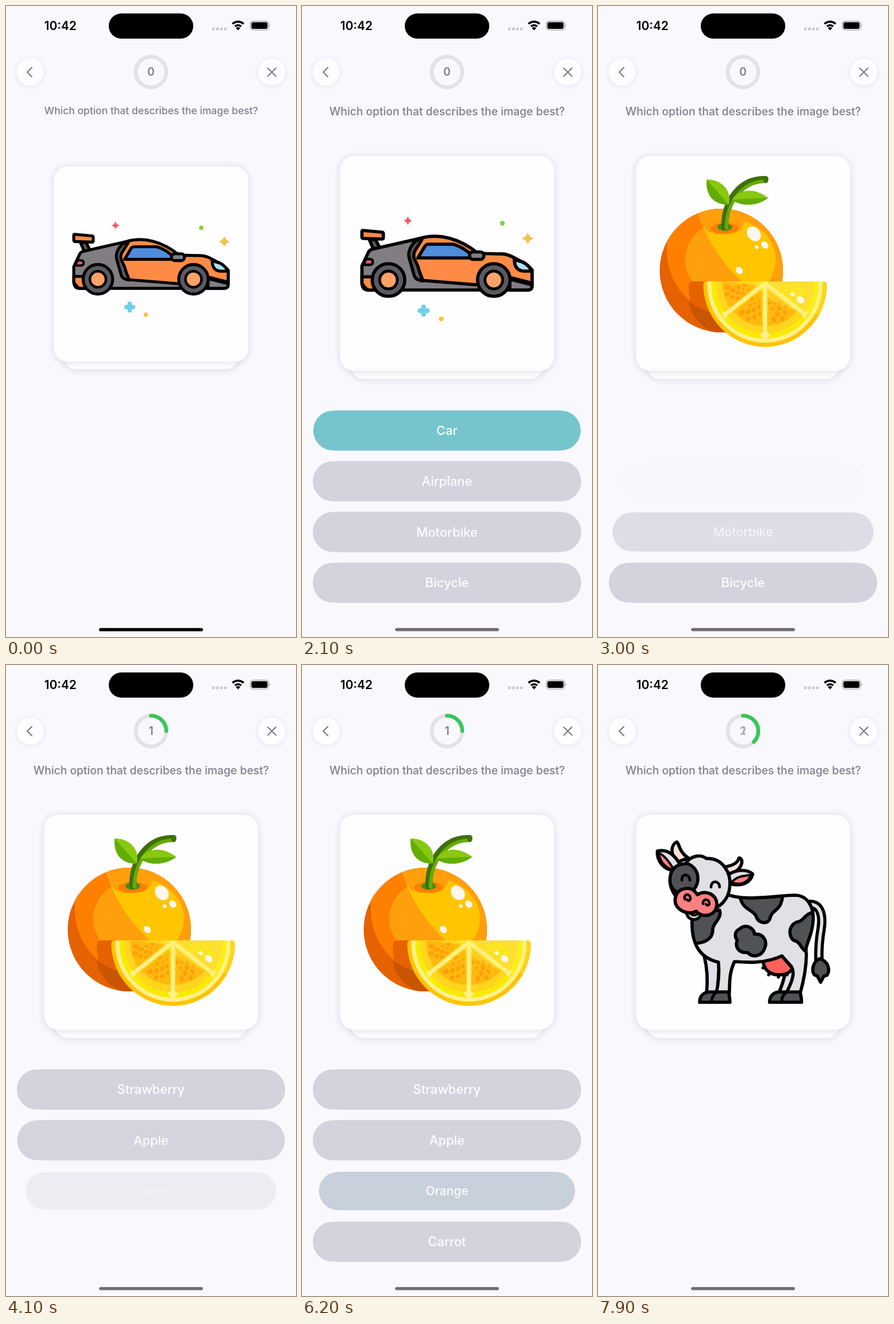
Animation of 508 by 1102 pixels, one loop 8 s. Source, as an HTML page with a canvas:

```html
<!DOCTYPE html>
<html lang="en">
<head>
<meta charset="utf-8">
<title>Picture quiz</title>
<style>
html, body { margin: 0; width: 100%; height: 100%; overflow: hidden; background: #f9f8fd; }
canvas { display: block; width: 508px; height: 1102px; }
</style>
</head>
<body>
<canvas id="stage"></canvas>
<script>
const W = 508, H = 1102, LOOP = 8000;
const BG = '#f9f8fd', WHITE = '#fefdff', INK = '#000', MUTED = '#807e8a';
const IDLE = [212, 210, 221], TEAL = [103, 195, 201];
const FONT = 'Inter, "Noto Sans", sans-serif';

const canvas = document.getElementById('stage');
const dpr = window.devicePixelRatio || 1;
canvas.width = W * dpr;
canvas.height = H * dpr;
const c = canvas.getContext('2d');

const clamp = v => Math.min(1, Math.max(0, v));
const ease = (t, start, dur) => {
  const p = clamp((t - start) / dur);
  return p * p * (3 - 2 * p);
};
const mix = (a, b, p) => `rgb(${a.map((v, i) => Math.round(v + (b[i] - v) * p))})`;

function paint(path, fill, stroke, width = 5.7) {
  const p = typeof path === 'string' ? new Path2D(path) : path;
  if (fill) { c.fillStyle = fill; c.fill(p); }
  if (stroke) { c.strokeStyle = stroke; c.lineWidth = width; c.stroke(p); }
}
function oval(x, y, rx, ry = rx, turn = 0) {
  const p = new Path2D();
  p.ellipse(x, y, rx, ry, turn, 0, Math.PI * 2);
  return p;
}
function box(x, y, w, h, r) {
  const p = new Path2D();
  p.roundRect(x, y, w, h, r);
  return p;
}
function text(str, x, y, size, weight, color) {
  c.font = `${weight} ${size}px ${FONT}`;
  c.textAlign = 'center';
  c.textBaseline = 'alphabetic';
  c.fillStyle = color;
  c.fillText(str, x, y);
}
function group(draw) { c.save(); draw(); c.restore(); }
function scaleAt(x, y, s) { c.translate(x, y); c.scale(s, s); c.translate(-x, -y); }
function shadow(blur, alpha, y = 0) {
  c.shadowColor = `rgba(40,36,60,${alpha})`;
  c.shadowBlur = blur * dpr;
  c.shadowOffsetY = y * dpr;
}
function star(x, y, r, color) {
  const k = r * 0.2;
  const arm = (px, py, qx, qy) => `Q${x + px} ${y + py} ${x + qx} ${y + qy}`;
  paint(`M${x} ${y - r}` + arm(k, -k, r, 0) + arm(k, k, 0, r) + arm(-k, k, -r, 0) + arm(-k, -k, 0, -r), color);
}

function drawCar() {
  const grey = '#807e82', dark = '#5b5a60', orange = '#fd8b45';
  paint('M118 408L126 427L137 424L129 408Z', dark, INK);
  paint('M107 392L140 395Q142.5 395.3 142.5 398V404Q142.5 407 139.5 407L108 406Q105 406 105 403V394Q105 392 107 392Z', orange, INK);
  paint('M206 406L122 425Q117 427 115 433L105 454V484Q106 496 116 496H394Q403 496 403 488V463L300 432Z', grey, INK);
  paint('M105 473H132V496H116Q109 492 105 484Z', orange, INK);
  paint('M108 452H118Q124 452 124 447Q124 442 118 442H112Z', '#ee5a6c', INK, 4.5);
  paint('M206 406C240 396 277 406 308 432L345 433C364 432 372 441 386 447Q396 453 403 461V484L364 474L330 487H307L208 479C200 462 198 450 192 440Q190 434 194 425Z', orange, INK);
  paint('M206 406Q189 416 187 433Q187 438 189 444L197 472Q200 479 212 480L205 462Q204 455 197 442Q194 435 198 427L210 408Z', dark, INK);
  paint('M203 440L215 420Q217 416 222 416H265Q283 421 298 436L301 440Z', '#4f8dda', INK);
  paint('M364 477L403 487V489Q403 496 395 496H364Z', grey, INK);
  paint('M372 443C372 457 379 463 390 463H403Q396 451 386 447Z', '#aee0f2', INK);
  paint(box(293.5, 429.5, 25, 13, 6), grey, INK);
  for (const x of [151.5, 336]) {
    paint(oval(x, 478.5, 28.5), dark, INK);
    paint(oval(x, 478.5, 15.5), '#fda267', INK, 5);
  }
  star(185.5, 375, 8, '#f05c6d');
  star(395.5, 406, 11, '#f1c24b');
  paint(oval(351, 379.5, 4.2), '#83d046');
  paint(oval(244, 546.5, 4.2), '#f8c636');
  paint('M213 525.5V538.5M206.5 532H219.5', null, '#70d0ea', 8.5);
}

function drawSlice() {
  const cx = 292.5, cy = 487, pith = '#fff08a';
  const half = r => `M${cx - r} ${cy}A${r} ${r} 0 0 0 ${cx + r} ${cy}V481H${cx - r}Z`;
  const ray = (a, r) => [cx + Math.cos(a) * r, cy - 3 + Math.sin(a) * r];
  const wedge = (a, b, r, inset) => {
    const p = new Path2D();
    p.moveTo(...ray((a + b) / 2, inset));
    p.lineTo(...ray(a + 0.06, r));
    p.arc(cx, cy - 3, r, a + 0.06, b - 0.06);
    p.closePath();
    return p;
  };
  group(() => {
    c.clip(new Path2D('M190 481H395Q401 481 401 487A108 108 0 0 1 184.5 487Q184.5 481 190 481Z'));
    paint(half(110), '#ffc400');
    paint(half(101), pith);
    paint(half(94), '#f8ea00');
    paint(half(85), '#ffd51f');
    const cuts = [-0.1, 0.67, Math.PI / 2, Math.PI - 0.67, Math.PI + 0.1];
    for (let i = 0; i < 4; i++) {
      const a = cuts[i], b = cuts[i + 1];
      paint(wedge(a, b, 75, 14), i ? '#ffba0d' : '#fdd516');
      for (let k = 0; k < 11; k++) {
        const f = (k * 0.618 + 0.31) % 1;
        const [x, y] = ray(a + 0.16 + (b - a - 0.32) * f, 32 + k * 3.7);
        const r = 2 + k * 0.28 + k % 2;
        paint(oval(x, y, r, r * 0.75, a + f), i ? '#ff9e0b' : '#f8e800');
      }
    }
    paint(`M${cx} 484L225 537M${cx} 484L361 537M${cx} 484V574`, null, pith, 6.5);
    paint(`M283 573Q291 570 ${cx} 562Q294 570 302 573L${cx} 584Z`, pith);
    paint('M217 534L231 534L222 547ZM368 534L354 534L363 547Z', pith);
    c.globalAlpha = 0.3;
    paint('M270 481C300 520 350 540 401 538V481Z', '#fff45c');
  });
  paint(oval(355, 513, 5.5, 7, -0.8), '#fff8ee');
  paint(oval(341, 503.5, 3, 3.5, -0.8), '#fff8ee');
}

function drawOrange() {
  const mid = '#ff8000', light = '#ff9f0c', deep = '#e66200', shine = '#fff6ee';
  const lit = new Path2D('M175 340V362C189 407 225 466 276 500L340 540V340Z');
  const glow = oval(232, 443, 79.5, 70);
  group(() => {
    c.clip(oval(216, 462, 108));
    paint('M100 340H340V590H100Z', deep);
    paint('M122 400C115 455 132 505 190 533L340 590V340H122Z', mid);
    paint(lit, light);
    paint(glow, light);
    group(() => { c.clip(lit); paint(glow, '#ffc500'); });
    paint('M187 386C189 403 253 405 256 377L222 366Z', light);
    paint('M159 489Q159 481 167 481H250V575H214C180 565 159 532 159 489Z', deep);
    paint('M159 516Q174 527 197 535L230 575H214C184 564 163 545 159 516Z', '#c95500');
  });
  paint(oval(222, 388.5, 25.5, 9.5), mid);
  paint(oval(222, 386, 13, 6.5), '#4c8d16');
  paint('M222 386C222 341 248 303 292 303', null, '#3f7008', 12.5);
  paint('M225 388C225 345 252 307 292 306', null, '#66aa08', 6);
  paint(oval(294, 303, 4.5, 6.3), '#3f7008');
  paint('M190.5 303C210 302 236 317 229 347C201 347 188 329 190.5 303Z', '#88c80f');
  paint('M190.5 303L229 347C201 347 188 329 190.5 303Z', '#62ad00');
  paint('M235 338C251 317 276 319 298 335C280 350 250 351 235 338Z', '#88c80f');
  paint('M235 338L298 335C280 350 250 351 235 338Z', '#62ad00');
  paint(oval(273, 398, 11, 14, -0.7), shine);
  paint(oval(292, 417.5, 5.5, 7, -0.8), shine);
  paint(oval(278, 421, 2.8, 3.5, -0.8), shine);
  paint(oval(247.5, 462, 5.5, 7, -0.8), shine);
  drawSlice();
}

function drawCow() {
  const hide = '#e1e0e5', patch = '#505256', pink = '#ff8080', horn = '#fddfd5';
  const tail = 'M371 418C391 418 394 440 391 460Q386 488 387 516';
  paint(tail, null, INK, 16.5);
  paint(tail, null, hide, 5.5);
  paint('M388 513C404 517 407 533 401 542L396 543L390 554L384 543L379 541C373 533 377 518 388 513Z', patch, INK);
  // far legs
  paint('M186 508Q194 540 190 574H209L213 512Z', hide, INK);
  paint('M330 510Q331 540 317 572H340L352 515Z', hide, INK);
  paint('M322 508L341 530Q333 542 316 541C300 541 290 531 289 516Z', '#ff605b', INK);
  for (const [x, y] of [[289, 529], [299, 541], [316, 545], [331, 541]]) paint(oval(x, y, 2.8), INK);
  const body = 'M225 400C255 414 315 402 345 402C371 403 378 428 377 445C375 478 361 488 365 505Q365 535 354 574H329C345 545 343 535 339 527L322 508C294 521 265 520 239 518C229 540 231 555 230 574H207C213 548 212 530 211 519C180 512 162 490 165 440Z';
  paint(body, hide);
  group(() => {
    c.clip(new Path2D(body));
    paint('M160 435L213 428C218 443 200 451 201 463C201 478 187 488 160 486Z', patch, INK);
    paint('M248 400C251 429 272 426 277 439C282 454 300 453 302 440C306 425 323 432 324 395Z', patch, INK);
    paint('M385 432C364 430 361 446 352 448C331 452 333 479 346 482C356 485 354 496 367 502L385 480Z', patch, INK);
  });
  paint('M248 461C259 450 275 461 274 470C291 469 298 483 291 497C285 510 269 511 262 502C247 504 239 492 244 481C238 473 240 465 248 461Z', patch, INK);
  paint(body, null, INK);
  for (const [x, w] of [[178, 53], [300.5, 56]]) {
    paint(`M${x} 589C${x} 577 ${x + 8} 571 ${x + 18} 571H${x + w - 3}Q${x + w} 578 ${x + w} 589Z`, patch, INK);
    paint(`M${x + 29} 572Q${x + 21} 578 ${x + 21} 589`, null, INK, 5);
  }

  paint('M140 344C124 330 129 313 138 309C142 310 141 326 158 337Z', horn, INK);
  paint('M219 353C235 351 245 346 247 337C255 337 256 356 231 366Z', horn, INK);
  paint('M136 359C114 359 103 341 104 325C120 321 133 330 143 347Z', hide, INK);
  paint('M133 358C116 355 108 341 106 328Q120 334 133 358Z', pink, INK, 4);
  paint('M228 366C243 357 261 356 271 365C267 382 249 387 231 382Z', hide, INK);
  paint('M234 380C241 369 256 368 268 367C263 380 250 385 234 380Z', pink, INK, 4);
  const head = 'M153 347C164 331 181 331 190 338C220 337 233 365 231 385C230 409 213 427 189 429C150 430 126 399 126 376Q126 349 153 347Z';
  paint(head, hide);
  group(() => {
    c.clip(new Path2D(head));
    paint(oval(150, 373, 25, 27), patch, INK);
  });
  paint(head, null, INK);
  paint('M155 431C156 449 179 449 181 432Z', hide, INK, 5);
  paint('M158 430Q168 444 179 431Z', '#f0525a', INK, 4);
  paint('M157 390C167 390 171 397 174 401C190 392 209 401 208 419C206 440 181 442 172 430C158 438 135 428 135 411Q136 391 157 390Z', pink, INK);
  paint('M147 376C146 364 160 363 161 376M198 388C198 375 213 376 213 388', null, INK, 4.7);
  paint('M152 409C149 399 162 398 162 408Q160 414 156 410M184 417C183 407 196 408 195 417Q193 422 189 418', null, INK, 4.5);
}

const CARDS = [drawCar, drawOrange, drawCow, null, null];
const SWAPS = [2210, 6610];
const SETS = [
  { labels: ['Car', 'Airplane', 'Motorbike', 'Bicycle'], answer: 0, show: 235, tap: 1756, hide: 2588 },
  { labels: ['Strawberry', 'Apple', 'Orange', 'Carrot'], answer: 2, show: 3675, tap: 6105, hide: 6990 }
];
const SCORES = [3370, 7725];

function drawCards(t) {
  const pos = SWAPS.reduce((sum, start) => sum + ease(t, start, 600), 0);
  group(() => {
    scaleAt(254, 465, 0.9 + 0.1 * ease(t, -58, 350));
    for (let i = CARDS.length - 1; i >= 0; i--) {
      const depth = i - pos;
      if (depth >= 2 || depth <= -1) continue;
      group(() => {
        const back = Math.max(0, depth);
        c.globalAlpha = clamp(2 - depth);
        c.translate(Math.max(0, -depth) * W, back * 33);
        scaleAt(254, 449, 1 - back * 0.1);
        group(() => {
          shadow(13, 0.15, 1);
          paint(box(66.5, 261.5, 375, 375.5, 25), WHITE);
        });
        if (CARDS[i]) CARDS[i]();
      });
    }
  });
}

// A capsule whose round ends ease into the straight edges.
function pill(w, h) {
  const r = h / 2, x = w / 2, p = new Path2D();
  const end = new Path2D(`M0 ${-r}H${x - 1.53 * r}C${x - 1.09 * r} ${-r} ${x - 0.87 * r} ${-r} ${x - 0.63 * r} ${-0.925 * r}` +
    `C${x - 0.25 * r} ${-0.775 * r} ${x} ${-0.41 * r} ${x} 0C${x} ${0.41 * r} ${x - 0.25 * r} ${0.775 * r} ${x - 0.63 * r} ${0.925 * r}` +
    `C${x - 0.87 * r} ${r} ${x - 1.09 * r} ${r} ${x - 1.53 * r} ${r}H-1V${-r}Z`);
  p.addPath(end);
  p.addPath(end, new DOMMatrix([-1, 0, 0, -1, 0, 0]));
  return p;
}
const PILL = pill(470, 70.6);

function drawButtons(t) {
  for (const set of SETS) {
    set.labels.forEach((label, i) => {
      const seen = ease(t, set.show + i * 155, 300) - ease(t, set.hide + i * 155, 300);
      if (seen <= 0) return;
      const chosen = i === set.answer;
      const press = chosen ? ease(t, set.tap, 95) - ease(t, set.tap + 95, 305) : 0;
      const size = (0.9 + 0.1 * seen) * (1 - 0.045 * press);
      group(() => {
        c.globalAlpha = seen;
        c.translate(254, 741.4 + i * 88.6);
        c.scale(size, size);
        paint(PILL, mix(IDLE, TEAL, chosen ? ease(t, set.tap, 450) : 0));
        text(label, 0, 8, 22.2, 500, '#fdfcff');
      });
    });
  }
}

function drawScore(t) {
  const score = SCORES.reduce((sum, start) => sum + ease(t, start, 350), 0);
  paint(oval(254, 115.3, 26.8), null, '#e2e1e6', 6.6);
  if (score > 0) {
    const arc = new Path2D();
    arc.arc(254, 115.3, 26.8, -Math.PI / 2, (score - 1) * Math.PI / 2);
    paint(arc, null, '#36c659', 6.6);
  }
  for (let n = 0; n < 3; n++) {
    const alpha = 1 - Math.abs(score - n);
    if (alpha <= 0) continue;
    c.globalAlpha = alpha;
    text(n, 254, 122.3, 19.5, 600, MUTED);
    c.globalAlpha = 1;
  }
}

function drawHeader(t) {
  text('10:42', 95.3, 42.3, 21, 600, INK);
  paint(box(180, 13, 148, 44, 22), INK);
  for (let i = 0; i < 4; i++) paint(box(361 + i * 7, 37.5, 4.6, 4.8, 1.5), '#c7c6cc');
  group(() => {
    c.lineCap = 'butt';
    for (const r of [7.5, 13.7]) {
      const arc = new Path2D();
      arc.arc(406.5, 41, r, -Math.PI * 0.75, -Math.PI * 0.25);
      paint(arc, null, INK, 3.7);
    }
    paint('M406.5 42.5L402.6 38.4Q406.5 35 410.4 38.4Z', INK);
  });
  paint(box(427.8, 26.3, 32.4, 15.8, 5), null, '#a4a3a9', 1.3);
  paint(box(429.8, 28.3, 28.4, 11.8, 3.3), INK);
  paint('M461.8 31.7Q464.3 34.2 461.8 36.7Z', '#a4a3a9');

  group(() => {
    shadow(10, 0.1, 1);
    paint(oval(42.5, 115.5, 23.7), WHITE);
    paint(oval(465.5, 115.5, 23.7), WHITE);
  });
  paint('M45.3 107.5L37.3 115.5L45.3 123.5M458.7 108.5L472.7 122.5M472.7 108.5L458.7 122.5', null, '#77747f', 2);
  drawScore(t);
  group(() => {
    scaleAt(254, 173, 0.9 + 0.1 * ease(t, -58, 350));
    text('Which option that describes the image best?', 254.3, 190.5, 19.4, 500, MUTED);
  });
}

function drawHomeBar(t) {
  const bar = box(163, 1086.5, 182, 5.5, 2.75);
  const tone = c.createLinearGradient(0, 1086, 0, 1092);
  tone.addColorStop(0, '#58575b');
  tone.addColorStop(1, '#838286');
  paint(bar, tone);
  c.globalAlpha = 1 - ease(t, 100, 700);
  paint(bar, INK);
  c.globalAlpha = 1;
}

function frame() {
  const t = performance.now() % LOOP;
  c.setTransform(dpr, 0, 0, dpr, 0, 0);
  c.lineCap = c.lineJoin = 'round';
  c.fillStyle = BG;
  c.fillRect(0, 0, W, H);
  drawHeader(t);
  drawButtons(t);
  drawCards(t);
  drawHomeBar(t);
  requestAnimationFrame(frame);
}
frame();
</script>
</body>
</html>
```
